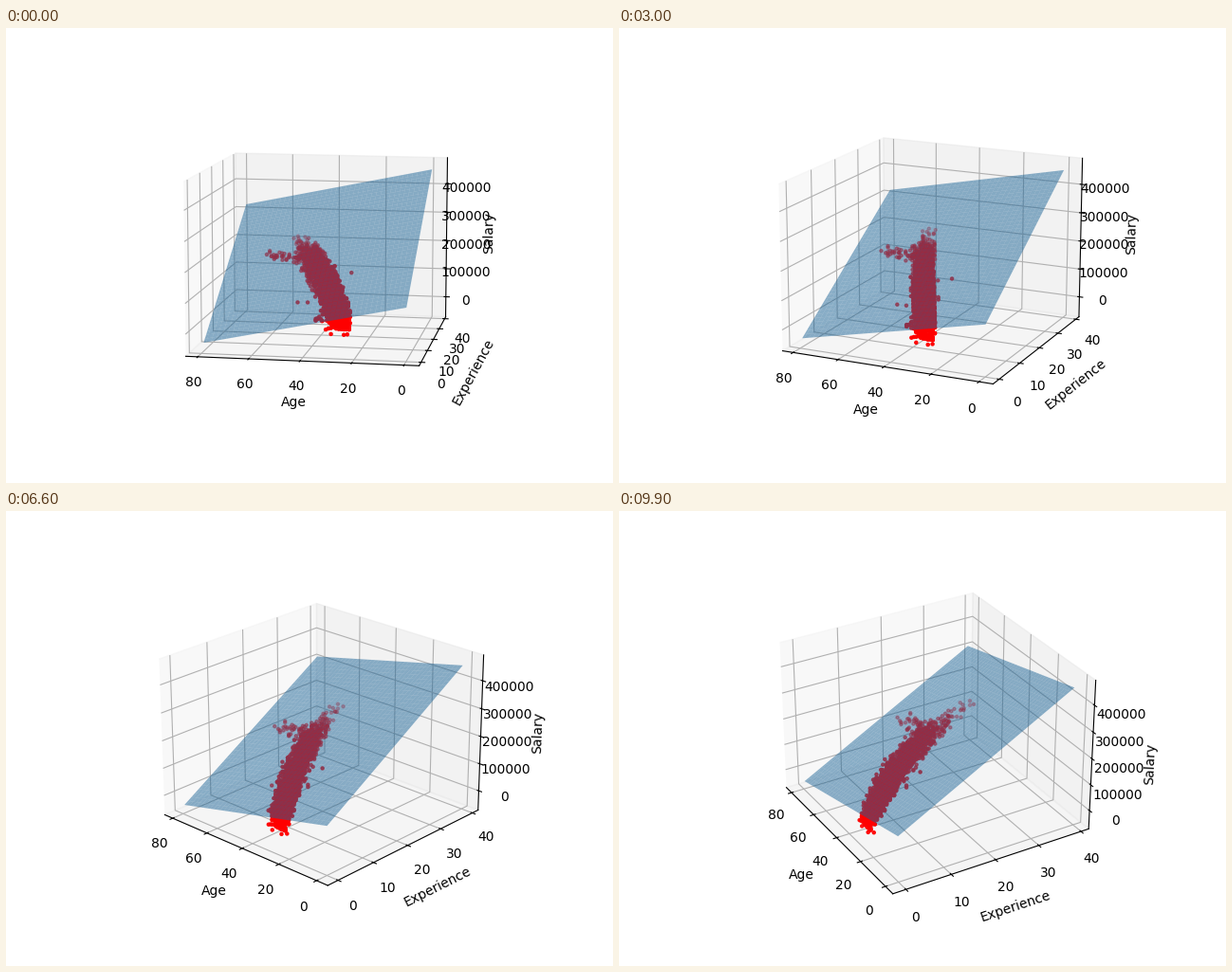
These frames come from a looping animation (640 by 480 pixels, 10000 ms). A matplotlib script:

```python
import matplotlib.pyplot as plt
import numpy as np
from matplotlib.animation import FuncAnimation

FRAMES, INTERVAL = 100, 100
BASE, PER_YEAR, PER_AGE = 102200, 9054, -1753

rng = np.random.default_rng(7)


def plane(age, exp):
    return BASE + PER_YEAR * exp + PER_AGE * age


def span(lo, hi):
    """Limits with 5 % data margin plus the 3D view margin."""
    pad = (hi - lo) * (0.05 + 1.1 / 48)
    return lo - pad, hi + pad


def career(n=1900):
    """Bulk of the staff: pay rises with experience and levels off."""
    exp = np.round(21 * rng.beta(0.95, 1.4, n))
    age = np.round(np.maximum(exp + 20.6 + 10.4 * rng.beta(1.6, 2.2, n), 22))
    mean = 222 - 180 * np.exp(-exp / 10)
    sigma = 12 + 3.7 * np.minimum(exp, 4) - 0.8 * np.maximum(exp - 10, 0)
    pay = mean + sigma * rng.uniform(-1.65, 1.65, n)
    return age, exp, np.maximum(pay, 25)


def seniors(n=100):
    exp = np.round(18 + 15 * rng.beta(1, 2.1, n))
    age = np.round(exp + rng.uniform(20.5, 27, n) - 0.15 * (exp - 18))
    pay = np.clip(rng.normal(206, 13, n) + 0.8 * (exp - 18), 180, 240)
    return age, exp, pay


def late_starters(n=45):
    age = np.round(45 + 17 * rng.beta(1, 1.3, n))
    exp = np.round(rng.uniform(16.6, 20.4, n))
    return age, exp, rng.normal(195, 6, n) + 0.5 * (age - 50)


def juniors(n=10):
    return (rng.integers(33, 37, n), rng.integers(2, 5, n),
            rng.uniform(30, 52, n))


strays = np.array([
    (25, 12, 170), (45, 8, 79), (41, 8, 80), (29, 10, 112), (29, 10, 104),
    (24, 0, 7), (29, 0, 8), (23, 1, 5), (31, 0, 22), (54, 32, 228),
    (48, 28, 234), (32, 13, 152),
]).T

age, exp, pay = np.hstack(
    [career(), seniors(), late_starters(), juniors(), strays])

fig = plt.figure(figsize=(6.4, 4.8), dpi=100)
ax = fig.add_subplot(projection="3d", computed_zorder=False)

ax.scatter(age, exp, pay * 1000, c="r", marker=".", s=20, zorder=1)
gx, gy = np.meshgrid(np.arange(80), np.arange(40))
ax.plot_surface(gx, gy, plane(gx, gy), alpha=0.5, zorder=2)

# Age runs backwards, so its limits are reversed.
ax.set(xlabel="Age", ylabel="Experience", zlabel="Salary",
       xticks=range(0, 81, 20), yticks=range(0, 41, 10),
       zticks=range(0, 400001, 100000),
       xlim=span(0, 79)[::-1], ylim=span(0, 39),
       zlim=span(plane(79, 0), plane(0, 39)))


def update(i):
    ax.view_init(elev=10 + 0.2 * i, azim=-80 + 0.5 * i)
    return ()


anim = FuncAnimation(fig, update, frames=FRAMES, interval=INTERVAL,
                     repeat=True, repeat_delay=0)
plt.show()
```
